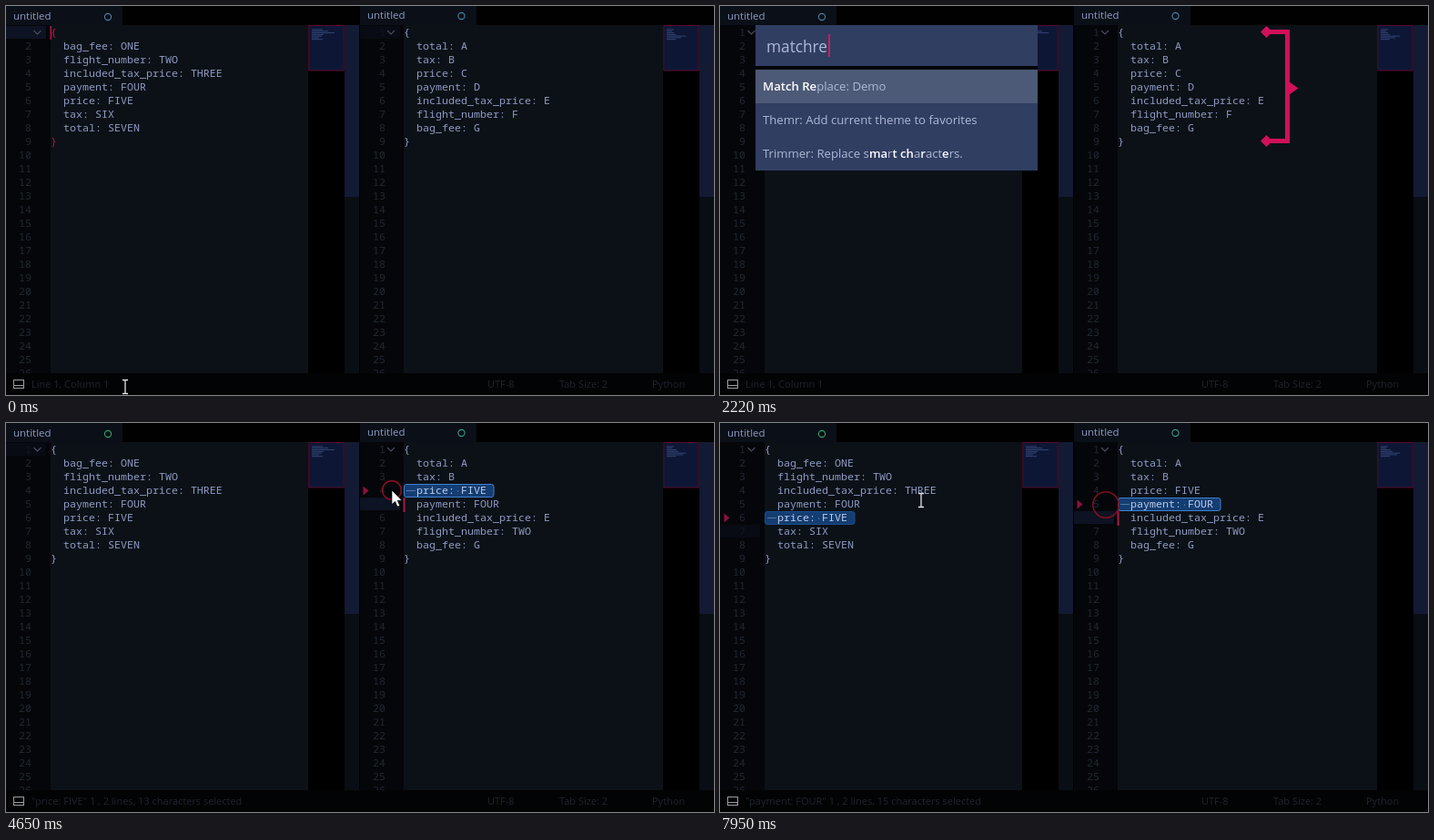
These frames come from a looping animation (778x428 px, 8000 ms). An HTML page:

```html
<!DOCTYPE html>
<html lang="en">
<head>
<meta charset="utf-8">
<title>Editor demo</title>
<style>
  html, body { margin: 0; width: 100%; height: 100%; overflow: hidden; background: #000; }
  svg { display: block; width: 778px; height: 428px; }
  text { white-space: pre; }
  .code { font: 11.67px "Noto Sans Mono", "DejaVu Sans Mono", monospace; }
  .ui { font-family: "Open Sans", "Noto Sans", sans-serif; }
</style>
</head>
<body>
<svg id="stage" viewBox="0 0 778 428">
  <defs>
    <clipPath id="body"><rect y="20" width="778" height="384"/></clipPath>
    <clipPath id="list"><rect x="39" y="70" width="286" height="274"/></clipPath>
  </defs>
  <g id="base"></g>
  <g id="live"></g>
</svg>
<script>
const LOOP = 8000;
const OPEN = 780, RUN = 2540;
const PICK = [4200, 6050, 7290];
const RIGHT = 389;
const TEXT = '#8f9bc3', PINK = '#d0105a', PANEL = '#303e62', CHOSEN = '#4d5a77', ITEM = '#adb9d6';

const leftRows = ['bag_fee: ONE', 'flight_number: TWO', 'included_tax_price: THREE',
  'payment: FOUR', 'price: FIVE', 'tax: SIX', 'total: SEVEN'];
const before = ['total: A', 'tax: B', 'price: C', 'payment: D',
  'included_tax_price: E', 'flight_number: F', 'bag_fee: G'];
const after = before.slice();
after[2] = 'price: FIVE';
after[3] = 'payment: FOUR';
after[5] = 'flight_number: TWO';

const commands = ['ANF: Copy', 'ANF: Delete Current File', 'ANF: Delete File', 'ANF: New File',
  'ANF: Rename File', 'ASCII Decorator: Generate Font Test (Lorem Ipsum)',
  'ASCII Decorator: Generate Font Test (Selected Text)', 'About'];
const bold = s => `<tspan fill="#fff" font-weight="600">${s}</tspan>`;
const matches = [bold('Match Re') + 'place: Demo', 'Themr: Add current theme to favorites',
  `Trimmer: Replace s${bold('ma')}r${bold('t ch')}a${bold('r')}act${bold('e')}rs.`];
const keyTimes = [1320, 1380, 1440, 1530, 1620, 1800, 2160];

// time, x, y, easing towards this point
const path = [
  [0, 131, 419], [2640, 131, 419], [3320, 348, 331], [3620, 348, 331], [4080, 424, 74],
  [4760, 424, 74], [5540, 27, 93], [5800, 27, 93], [6000, 31, 98], [6420, 31, 98],
  [6810, 186, 115, 'in'], [7180, 424, 90, 'out'], [7440, 424, 90], [7930, 221, 85]
];
const ease = {
  in: p => p * p * (2 - p),
  out: p => 1 - (1 - p) * (1 - p),
  both: p => p * p * (3 - 2 * p)
};

const clamp = v => Math.max(0, Math.min(1, v));
const base = n => 18 + 15 * n;
const rect = (x, y, w, h, fill, extra = '') =>
  `<rect x="${x}" y="${y}" width="${w}" height="${h}" fill="${fill}" ${extra}/>`;
const code = (x, n, s, fill = TEXT, extra = '') =>
  `<text class="code" x="${x}" y="${base(n)}" fill="${fill}" ${extra}>${s}</text>`;
const ui = (x, y, s, size, fill) =>
  `<text class="ui" x="${x}" y="${y}" font-size="${size}" fill="${fill}">${s}</text>`;
const line = (d, stroke, w = 1) =>
  `<path d="${d}" fill="none" stroke="${stroke}" stroke-width="${w}"/>`;

function drawBase() {
  let s = rect(0, 0, 778, 428, '#010102');
  for (const x of [0, RIGHT]) {
    const code0 = x ? 437 : 49, map = x ? 722 : 332;
    s += rect(x, 0, 128, 21, '#0b0f17');
    s += ui(x + 8, x ? 14 : 15, 'untitled', 11.5, '#8c9cc4');
    s += rect(x, 21, code0 - x, 383, '#040609');
    s += rect(code0, 21, map - code0, 383, '#0c1117');
    s += rect(map, 21, 40, 383, '#000');
    s += rect(map + .8, 21.5, 38.4, 49.5, '#0d1735', 'stroke="#5b0b2d"');
    s += rect(map + 40, 21, 16, 383, '#090e14') + rect(map + 40, 21, 16, 189, '#131a34');
  }
  s += rect(388, 0, 1, 404, '#000') + rect(0, 404, 778, 24, '#020304');
  s += '<g stroke="#9a9ca3" fill="none"><rect x="8.5" y="411.5" width="11" height="9"/><path d="M9 417.5H19"/></g>';
  s += ui(529, 420, 'UTF-8', 11, '#20242e') + ui(608, 420, 'Tab Size: 2', 11, '#20242e') +
    ui(710, 420, 'Python', 11, '#20242e');
  return s;
}

// active is 0 when no line is highlighted
function pane(x, rows, active, focused, red) {
  const code0 = x ? 437 : 49, edge = x ? 417 : 28, map = x ? 722 : 332;
  let s = active ? rect(x, base(active) - 11, 44, 14, focused ? '#0d1322' : '#080b13') : '';
  for (let n = 1; n <= 26; n++)
    s += code(edge, n, n, n === active ? '#111623' : '#222833', 'text-anchor="end"');
  s += line(`M${x ? 419 : 30.5} 27l4 4l4 -4`, '#4a4a5c', 1.2);
  const brace = red ? '#b3134b' : TEXT;
  s += code(code0, 1, '{', brace) + code(code0, 9, '}', brace);
  rows.forEach((row, i) => {
    s += code(code0 + 14, i + 2, row);
    s += rect(map + 4, 25.5 + i * 1.8, row.length, .8, '#3b4c80');
  });
  return `<g clip-path="url(#body)">${s}</g>`;
}

function selection(x, n, row, focused) {
  const y = base(n) - 10.5, w = 14.5 + 7 * (row.length + 1);
  const gap = row.indexOf(' ');
  return rect(x + .5, y, w, 14, '#143d72', `rx="2.5" stroke="${focused ? '#3f80d0' : '#1c4c86'}"`) +
    line(`M${x + 3} ${y + 7}h10`, '#5276a0') +
    code(x + 14, n, row, '#bccbe8') +
    rect(x + 14 + gap * 7 + 3, y + 7, 1, 1, '#7c9ac2') +
    `<path d="M${x - 44.5} ${y + 2}l6 5l-6 5z" fill="#8e1040"/>`;
}

function bracket(alpha) {
  if (alpha <= 0) return '';
  const diamond = y => `M594 ${y}l6.5 -6.5l6.5 6.5l-6.5 6.5z`;
  return `<g opacity="${alpha}">` + line('M600 28.5H623.5V148.5H600', PINK, 5) +
    `<path d="${diamond(28.5)}${diamond(148.5)}M625 83l10.5 7.5l-10.5 7.5z" fill="${PINK}"/></g>`;
}

function palette(t) {
  if (t < OPEN || t >= RUN) return '';
  const typed = 'matchre'.slice(0, keyTimes.filter(k => t >= k).length);
  const advance = [0, 16, 26, 32, 40, 51, 58, 69][typed.length];
  const short = t >= 1860;
  let s = rect(39, 21, 310, short ? 160 : 323, '#020305');
  s += rect(39, 21, 310, 45, PANEL);
  s += ui(51, 51, typed, 17.3, ITEM);
  s += rect(50 + advance, 31, 2, 25, '#c71f5c');
  if (short) {
    s += rect(39, 70, 310, 111, PANEL) + rect(39, 70, 310, 37, CHOSEN);
    matches.forEach((m, i) => s += ui(47, 93 + 37 * i, m, 13.15, ITEM));
    return s;
  }
  s += rect(39, 70, 293, 274, PANEL) + rect(332, 70, 17, 274, '#070a12');
  s += rect(332, 70, 17, 7, '#1a2138') + rect(39, 307, 293, 37, CHOSEN);
  const rows = commands.map((c, i) => ui(47, 69.5 + 37.2 * i, c, 13.35, ITEM)).join('');
  return s + `<g clip-path="url(#list)">${rows}</g>`;
}

function ring(t) {
  const spots = [[424, 74], [31, 98], [424, 90]];
  return PICK.map((start, i) => {
    const age = t - start;
    if (age < 0 || age > 1050) return '';
    const [x, y] = spots[i];
    return `<circle cx="${x}" cy="${y}" r="${2 + age * .0185}" fill="none" stroke="#7d1022" stroke-width="1.6" opacity="${clamp((1050 - age) / 300)}"/>`;
  }).join('');
}

function pointer(t) {
  // hidden while typing
  if (t >= keyTimes[0] && t < RUN) return '';
  let i = 0;
  while (i < path.length - 1 && t >= path[i + 1][0]) i++;
  const a = path[i], b = path[i + 1] || a;
  const p = b === a ? 0 : ease[b[3] || 'both']((t - a[0]) / (b[0] - a[0]));
  const x = a[1] + (b[1] - a[1]) * p, y = a[2] + (b[2] - a[2]) * p;
  const beam = (x > 49 && x < 332) || (x > 437 && x < 722);
  const shape = beam
    ? line('M-3 -7.5h2.2l.8 .8l.8 -.8h2.2M0 -7v14M-3 7.5h2.2l.8 -.8l.8 .8h2.2', '#e4e4e8', 1.3)
    : '<path d="M0 0V15.5L3.6 12.2L6 18L8.7 16.9L6.2 11.2H11Z" fill="#fff" stroke="#000" stroke-width=".6"/>';
  return `<g transform="translate(${x} ${y})">${shape}</g>`;
}

function draw(t) {
  const step = PICK.filter(p => t >= p).length;
  const rightFocus = step === 1 || step === 3;
  const inPalette = t >= OPEN && t < RUN;
  const leftLine = inPalette ? 0 : step >= 2 ? 7 : 1;
  const rightLine = inPalette ? 0 : [1, 5, 5, 6][step];
  const rows = t < RUN ? before : after;
  let s = pane(0, leftRows, leftLine, !rightFocus, step === 0) +
    pane(RIGHT, rows, rightLine, rightFocus, false);

  const dot = (x, y, c) => `<circle cx="${x}" cy="${y}" r="3.6" fill="none" stroke="${c}" stroke-width="1.1"/>`;
  s += dot(112, 12, t < PICK[0] ? '#4d83a4' : '#36a06d') + dot(500.5, 11, t < RUN ? '#4d83a4' : '#3f9b83');

  if (step >= 2) s += selection(49, 6, 'price: FIVE', step === 2);
  if (step === 1 || step === 2) s += selection(437, 4, 'price: FIVE', step === 1);
  if (step === 3) s += selection(437, 5, 'payment: FOUR', true);
  if (step === 0 && !inPalette) s += rect(48.5, 22, 1.5, 15, '#b3134b');
  if (rightFocus) s += rect(436.5, base(rightLine) - 11, 2, 16, '#a81a48');
  if (step === 2 && t < 6500) s += rect(48.5, base(7) - 11, 2, 16, '#a81a48');

  const picked = '"price: FIVE" 1 , 2 lines, 13 characters selected';
  const status = ['Line 1, Column 1', picked, picked,
    '"payment: FOUR" 1 , 2 lines, 15 characters selected'][step];
  s += ui(28, 420, status, 11, '#20242e');
  s += bracket(Math.min(clamp((t - 30) / 500), clamp((2820 - t) / 280)));
  return s + palette(t) + ring(t) + pointer(t);
}

const live = document.getElementById('live');
document.getElementById('base').innerHTML = drawBase();
const begin = performance.now();
function tick() {
  live.innerHTML = draw((performance.now() - begin) % LOOP);
  requestAnimationFrame(tick);
}
tick();
</script>
</body>
</html>
```
